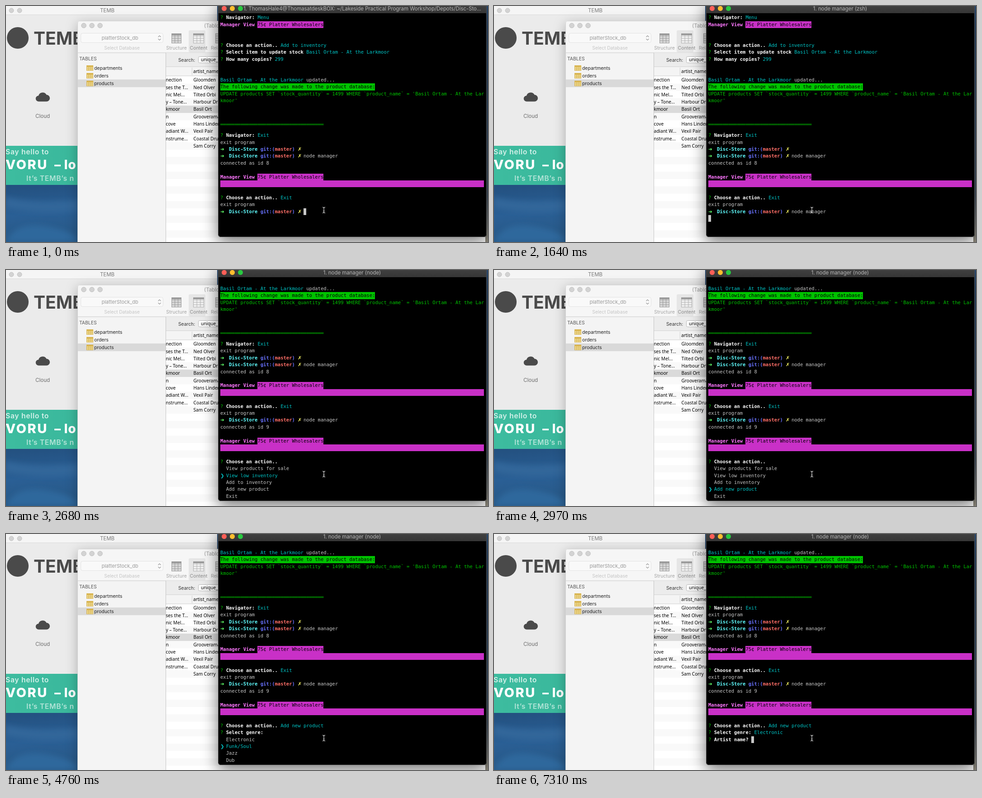
An HTML page for the animation above (8 s loop, 1066 by 525 pixels).

```html
<!DOCTYPE html>
<html lang="en">
<head>
<meta charset="utf-8">
<title>Terminal session</title>
<style>
  html, body { margin: 0; width: 100%; height: 100%; overflow: hidden; background: #34506f; }
  #desk { position: absolute; left: 0; top: 0; }
  #desk text { font-family: Inter, "Open Sans", sans-serif; }
  #desk .cell { font: 500 10.1px "Noto Sans", "Open Sans", sans-serif; fill: #000; }
  .mid { text-anchor: middle; }
  .shade { filter: drop-shadow(0 6px 13px rgba(0,0,0,.26)); }
  #term {
    position: absolute; left: 469px; top: -10px; width: 594px; height: 524px;
    background: #000; border-radius: 6px; overflow: hidden;
    box-shadow: 0 10px 34px rgba(0,0,0,.55);
  }
  #edge {
    position: absolute; inset: 0; border: 1px solid #4c4c4c; border-top: 0;
    border-radius: 6px; box-sizing: border-box;
  }
  #bar {
    position: absolute; left: 0; top: 0; width: 100%; height: 26px;
    background: linear-gradient(#444, #363636);
  }
  #bar i { position: absolute; top: 10px; width: 11px; height: 11px; border-radius: 50%; }
  #title {
    position: absolute; top: 8px; width: 700px; margin-left: -350px; text-align: center;
    font: 11.4px/16px Inter, "Open Sans", sans-serif; color: #b9b9b9; white-space: pre;
  }
  #screen {
    position: absolute; left: 5px; top: 28.3px; color: #c7c7c7;
    font: 10.545px/15.41px "DejaVu Sans Mono", "Liberation Mono", monospace;
  }
  #screen div { height: 15.41px; white-space: pre; }
  #screen b { color: #fff; }
  #screen span.box { display: inline-block; height: 15.41px; vertical-align: top; color: #000; }
  #screen .sym {
    display: inline-block; width: 6.348px; height: 15.41px; vertical-align: top;
    font-family: "DejaVu Sans", sans-serif;
  }
  #screen .g { color: #00c200; }
  #screen .c { color: #00c5c7; }
  #screen .d { color: #686868; }
  #screen .m { color: #ff77ff; }
  #screen .a { color: #5ffa68; }
  #screen .n { color: #60fdff; }
  #screen .p { color: #6871ff; }
  #screen .r { color: #ff6e67; }
  #screen .y { color: #fffc67; }
  #screen .rule { position: relative; top: 6.5px; }
  #screen .bgm { background: #c930c7; }
  #screen .bgg { background: #00c200; }
  #screen .cur { background: #c7c7c7; width: 1ch; }
  #mouse { position: absolute; left: 698px; top: 446px; }
</style>
</head>
<body>
<svg id="desk" width="1066" height="525" viewBox="0 0 1066 525">
  <defs>
    <linearGradient id="sea" x1="0" y1="0" x2=".3" y2="1">
      <stop offset="0" stop-color="#23507f"/>
      <stop offset=".5" stop-color="#2a5f95"/>
      <stop offset="1" stop-color="#285783"/>
    </linearGradient>
    <linearGradient id="coast" x1="0" y1="0" x2="0" y2="1">
      <stop offset="0" stop-color="#2c4f78"/>
      <stop offset=".8" stop-color="#4a5a6c"/>
      <stop offset="1" stop-color="#a39d8e"/>
    </linearGradient>
    <linearGradient id="bay" x1="0" y1="0" x2="1" y2="0">
      <stop offset="0" stop-color="#3dbc9f"/>
      <stop offset="1" stop-color="#36b096"/>
    </linearGradient>
    <filter id="soft" x="-30%" y="-30%" width="160%" height="160%"><feGaussianBlur stdDeviation="6"/></filter>
  </defs>

  <rect width="1066" height="525" fill="url(#coast)"/>
  <rect y="398" width="480" height="127" fill="url(#sea)"/>
  <g filter="url(#soft)">
    <path d="M0 425Q60 440 158 432V455Q80 465 0 450Z" fill="#30669a"/>
    <path d="M0 525Q20 478 90 490T158 525Z" fill="#2d689c"/>
  </g>

  <rect y="-5" width="467" height="403" fill="#ebebeb"/>
  <rect width="467" height="19" fill="#f5f5f5"/>
  <path d="M0 19.5H467" stroke="#dadada"/>
  <g fill="#d3d3d3" stroke="#c2c2c2"><circle cx="12" cy="10" r="5"/><circle cx="30" cy="10" r="5"/></g>
  <text class="mid" x="224" y="14" font-size="11.4" fill="#777">TEMB</text>
  <circle cx="26" cy="71" r="24" fill="#4a4a4a"/>
  <text x="61" y="86" font-size="39" font-weight="700" fill="#4a4a4a">TEMB</text>
  <path d="M72.500 212.500a6.500 6.500 0 0 1-.5-13a9.500 9.500 0 0 1 17.500-2a7.500 7.500 0 0 1 0 15Z" fill="#4a4a4a"/>
  <text class="mid" x="81" y="249" font-size="11.600" fill="#6e6e6e">Cloud</text>
  <rect y="311" width="467" height="87" fill="url(#bay)"/>
  <g font-weight="600" letter-spacing=".7">
    <text x="-1" y="330" font-size="15.700" fill="#d5f1ea">Say hello to</text>
    <text x="-1" y="363" font-size="29" font-weight="800" letter-spacing="2.500" fill="#fff">VORU</text>
    <text x="107" y="363" font-size="28" font-weight="800" fill="#fff">– lo</text>
    <text x="45" y="389" font-size="15.700" fill="#b3e4d8">It’s TEMB’s n</text>
  </g>

  <path class="shade" d="M158 525V38q0-5 5-5H1060V560H158Z" fill="#f6f6f6"/>
  <path d="M158.500 525V38q0-4.500 5-4.500H480" fill="none" stroke="#d4d4d4"/>
  <rect x="159" y="104" width="194" height="421" fill="#f4f4f4"/>
  <rect x="354" y="104" width="706" height="421" fill="#fff"/>
  <g id="client"></g>
</svg>

<div id="term">
  <div id="bar">
    <i style="left:7.500px;background:#ff5f57"></i>
    <i style="left:25.500px;background:#ffbd2e"></i>
    <i style="left:43.500px;background:#28c940"></i>
    <div id="title"></div>
  </div>
  <div id="screen"></div>
  <div id="edge"></div>
</div>

<svg id="mouse" width="10" height="16" viewBox="0 0 10 16">
  <path d="M2 1.500Q5 1.500 5 4Q5 1.500 8 1.500M5 4V12M2 14.500Q5 14.500 5 12Q5 14.500 8 14.500M3.500 10H6.500"
    fill="none" stroke="#e8e8e8" stroke-width="1.100"/>
</svg>

<script>
const $ = id => document.getElementById(id);

// Database client window
const label = (x, y, s, attrs = '') => `<text x="${x}" y="${y}" ${attrs}>${s}</text>`;
const box = (x, y, w, h, fill, attrs = '') =>
  `<rect x="${x}" y="${y}" width="${w}" height="${h}" fill="${fill}" ${attrs}/>`;

function grid(x, y, w, h, fill, line) {
  return box(x, y, w, h, fill, `stroke="${line}"`) +
    `<path d="M${x} ${y + h / 4}h${w}m0 ${h / 4}h${-w}m0 ${h / 4}h${w}M${x + w / 3} ${y}v${h}m${w / 3} 0v${-h}" stroke="${line}" fill="none"/>`;
}

function drawClient() {
  const grey = 'class="mid" font-size="10.4" fill="#a3a3a3"';
  let s = '';
  for (const x of [172, 190, 208]) s += `<circle cx="${x}" cy="43.500" r="5.300" fill="#d3d3d3" stroke="#c2c2c2"/>`;
  s += label(438, 48, '(Tablo', 'font-size="11.4" fill="#999"');
  s += box(165.5, 60.5, 182, 21, '#f9f9f9', 'rx="4" stroke="#e2e2e2"');
  s += label(252, 75, 'platterStock_db', 'class="mid" font-size="11" fill="#999"');
  s += '<path d="M336.500 69l3-3 3 3M336.500 73l3 3 3-3" fill="none" stroke="#999" stroke-width="1.200"/>';
  s += label(256.5, 97, 'Select Database', 'class="mid" font-size="10.2" fill="#c4c4c4"');
  s += box(404, 54, 37, 49, '#e6e6e6', 'rx="3"');
  s += grid(366.5, 61.5, 21, 21, '#d8d8d8', '#9a9a9a') + box(366, 61, 22, 4, '#999');
  s += grid(414.5, 61.5, 23, 21, '#f0f0f0', '#b0b0b0') + box(414, 61, 24, 4, '#999');
  s += grid(463.5, 61.5, 21, 21, '#d8d8d8', '#9a9a9a');
  s += label(377, 97, 'Structure', grey) + label(426, 97, 'Content', grey.replace('a3a3a3', '8a8a8a'));
  s += label(453, 97, 'Relations', 'font-size="10.4" fill="#a3a3a3"');
  s += '<path d="M159 104H480" stroke="#c9c9c9"/>';

  s += label(162, 121, 'TABLES', 'font-size="10.4" fill="#555"');
  s += box(159, 163.5, 194, 17, '#d9d9d9');
  ['departments', 'orders', 'products'].forEach((name, i) => {
    const y = 138 + 17.2 * i;
    s += grid(178.5, y - 5.5, 14, 11, '#f8e9a6', '#d0ab4a') + box(178, y - 6, 15, 3, '#d9b550');
    s += label(195, y + 4, name, 'font-size="10.4" fill="#222"');
  });

  s += box(354, 104.5, 126, 30.5, '#ececec');
  s += label(381, 123.5, 'Search:', 'font-size="10.3" fill="#333"');
  s += box(425.5, 112.5, 90, 14, '#fff', 'rx="3" stroke="#b5b5b5"');
  s += label(431, 123, 'unique_id', 'class="cell"');
  s += box(354, 135, 126, 20.5, '#f4f4f4');
  s += '<path d="M354 135H480M354 155.500H480M411.500 137V154" stroke="#d0d0d0"/>';
  s += label(414, 149, 'artist_name', 'class="cell"');

  const pitch = 16.32, top = 156.3;
  for (let i = 0; i < 23; i++) if (i % 2) s += box(354, top + i * pitch, 126, pitch, '#f9f9f9');
  s += box(354, top + 4 * pitch, 126, pitch, '#dadada');
  const rows = [
    'nection|Gloomden', 'ses the T...|Ned Olver', 'nic Mel...|Tilted Orbi', 'y – Tone...|Harbour Drif',
    'kmoor|Basil Ort', 'n|Grooverama', 'cove|Hans Lindem', 'adiant W...|Vexil Pair',
    'nstrume...|Coastal Dru', '|Sam Corry'
  ];
  rows.forEach((row, i) => {
    const [album, artist] = row.split('|'), y = 168.2 + i * pitch;
    s += label(353.5, y, album, 'class="cell"') + label(414.5, y, artist, 'class="cell"');
  });
  s += '<path d="M353.500 104V525" stroke="#c4c4c4"/>';
  $('client').innerHTML = s;
}

// Terminal markup
const tag = (cls, s) => `<span class="${cls}">${s}</span>`;
const sym = (cls, s) => tag('sym ' + cls, s);
const ask = (q, answer = '') => `${tag('g', '?')} <b>${q}</b> ${answer}`;
const reply = (q, s) => ask(q, tag('c', s));
const cursor = tag('box cur', ' ');
const hint = tag('d', '(Use arrow keys)');
const prompt = (cmd = '') =>
  `<b>${sym('a', '➜')}  ${tag('n', 'Disc-Store')} ${tag('p', 'git:(')}${tag('r', 'master')}${tag('p', ')')} ${sym('y', '✗')}</b> ${cmd}`;
const menu = (items, pick) =>
  items.map((s, i) => i === pick ? tag('c', sym('', '❯') + ' ' + s) : '  ' + s);

const record = 'Basil Ortam - At the Larkmoor';
const banner = `<b class="m">Manager View</b> ${tag('box bgm', '75¢ Platter Wholesalers')}`;
const stripe = tag('box bgm', ' '.repeat(92));
const action = 'Choose an action..';
const command = 'node manager';

const history = [
  reply('Navigator:', 'Menu'), banner, '', '',
  reply(action, 'Add to inventory'),
  reply('Select item to update stock', record),
  reply('How many copies?', '299'), '', '',
  tag('c', record) + ' updated...',
  tag('box bgg', 'The following change was made to the product database:'),
  tag('g', "UPDATE products SET `stock_quantity` = 1499 WHERE `product_name` = 'Basil Ortam - At the Lar"),
  tag('g', "kmoor'"), '', '',
  tag('g rule', '═'.repeat(36)), '',
  reply('Navigator:', 'Exit'), 'exit program',
  prompt(), prompt(command), 'connected as id 8', '',
  banner, stripe, '',
  reply(action, 'Exit'), 'exit program'
];
const session = ['', ...history.slice(9), prompt(command), 'connected as id 9', '', banner, stripe, ''];

const actions = ['View products for sale', 'View low inventory', 'Add to inventory', 'Add new product', 'Exit'];
const genres = ['Electronic', 'Funk/Soul', 'Jazz', 'Dub'];
const chosen = reply(action, 'Add new product');

const typing = n => [...history, prompt(command.slice(0, n) + cursor)];
const choose = (pick, tip = '') => [...session, ask(action, tip), ...menu(actions, pick)];
const genre = (pick, tip = '') => [...session, chosen, ask('Select genre:', tip), ...menu(genres, pick)];

const steps = [
  [0, () => typing(0)], [450, () => typing(2)], [600, () => typing(3)], [750, () => typing(5)],
  [900, () => typing(6)], [1050, () => typing(8)], [1200, () => typing(9)],
  [1350, () => typing(11)], [1500, () => typing(12)],
  [1640, () => [...history, prompt(command), cursor]],
  [1930, () => choose(0, hint)], [2080, () => choose(0, hint)],
  [2680, () => choose(1)], [2820, () => choose(2)], [2970, () => choose(3)],
  [3870, () => genre(0, hint)], [4760, () => genre(1)], [4910, () => genre(2)],
  [5060, () => genre(3)], [5360, () => genre(0)], [5810, () => genre(1)], [6860, () => genre(0)],
  [7310, () => [...session, chosen, reply('Select genre:', 'Electronic'), ask('Artist name?', cursor)]]
];

function setTitle(t) {
  const idle = t < 1640;
  $('title').textContent = idle
    ? '1. ThomasHale4@ThomasatdeskBOX: ~/Lakeside Practical Program Workshop/Depots/Disc-Sto...'
    : `1. node manager (${t < 2080 ? 'zsh' : 'node'})`;
  $('title').style.left = (idle ? 319 : 296.5) + 'px';
}

let shown = -1;
const start = performance.now();
function tick() {
  const t = (performance.now() - start) % 8000;
  let i = steps.length - 1;
  while (steps[i][0] > t) i--;
  if (i !== shown) {
    shown = i;
    $('screen').innerHTML = steps[i][1]().map(s => `<div>${s}</div>`).join('');
    setTitle(steps[i][0]);
  }
  requestAnimationFrame(tick);
}

drawClient();
tick();
</script>
</body>
</html>
```
